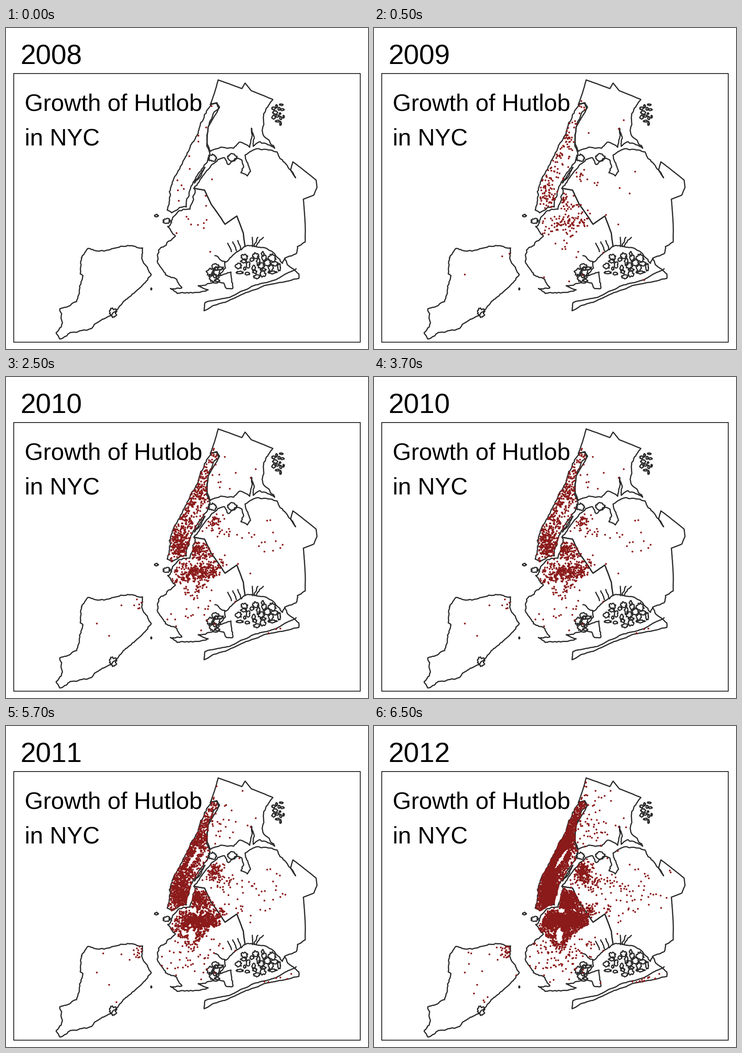
Write a matplotlib script that moves like this. It is 795 px wide and 705 px high and loops after 8 s.

```python
import numpy as np
import matplotlib.pyplot as plt
from matplotlib.animation import FuncAnimation
from matplotlib.path import Path

W, H, PX = 795, 705, 0.72
INK, DOT = "#2b2b2b", "#8b1a1a"
SHARE = (0.004, 0.055, 0.2, 0.45, 1)  # part of all dots present in each year
rng = np.random.default_rng(7)
plt.rcParams["text.kerning_factor"] = 6  # unkerned digits


def rough(*flat, grain=1.0):
    """Join a few key points by midpoint displacement, like a coastline."""
    line = np.array(flat, float).reshape(-1, 2)
    while True:
        step = np.diff(line, axis=0)
        length = np.hypot(*step.T)
        if length.max() < 5:
            return line
        long = np.flatnonzero(length >= 5)
        sigma = grain * (0.4 + 0.03 * length[long, None])
        middle = line[long] + step[long] / 2 + rng.normal(0, 1, (len(long), 2)) * sigma
        line = np.insert(line, long + 1, middle, axis=0)


def straight(*flat):
    return rough(*flat, grain=0.15)


def blob(cx, cy, rx, ry):
    n = int(9 + rx + ry)
    angle = np.linspace(0, 2 * np.pi, n)
    r = rng.uniform(0.65, 1.15, n)
    r[-1] = r[0]
    return np.column_stack([cx + rx * r * np.cos(angle), cy + ry * r * np.sin(angle)])


def archipelago(cx, cy, rx, ry, count, size):
    """Small islands scattered evenly over an ellipse."""
    for k in range(count):
        angle, r = 2.4 * k, np.sqrt((k + 0.5) / count)
        x, y = cx + rx * r * np.cos(angle), cy + ry * r * np.sin(angle)
        yield blob(x, y, *size * rng.uniform(0.4, 1.3, 2))


manhattan = rough(
    452, 166, 440, 183, 422, 232, 394, 283, 369, 330, 362, 350, 354, 400, 364, 406,
    380, 395, 396, 393, 402, 365, 414, 335, 441, 296, 448, 276, 441, 245, 444, 217,
    467, 176, 463, 166, 452, 166)
bronx = np.vstack([
    straight(449, 168, 457, 145, 466, 114, 518, 133, 525, 121, 539, 138, 586, 157),
    rough(586, 157, 566, 188, 564, 233, 590, 264, 556, 250, 543, 260, 539, 220,
          535, 262, 512, 251, 500, 264, 475, 262, 449, 271),
    rough(449, 271, 442, 255, 444, 217, 469, 174, 463, 164, 449, 168, grain=0.4)])
border = straight(413, 352, 436, 356, 450, 386, 481, 431, 507, 413, 521, 450, 525, 480)
queens = np.vstack([
    rough(413, 352, 440, 314, 465, 289, 480, 285, 488, 300, 508, 286, 518, 290, 522, 305,
          516, 318, 530, 325, 537, 315, 525, 279, 555, 265, 595, 272, 604, 288, 636, 329),
    straight(636, 329, 625, 312, 630, 294, 681, 334, 683, 350, 676, 367, 653, 376,
             657, 430, 657, 470),
    rough(657, 470, 640, 480, 638, 495, 612, 506, 607, 517, 590, 496, 565, 482, 525, 480),
    border[::-1]])
brooklyn = np.vstack([
    border,
    rough(525, 480, 498, 499, 480, 515, 482, 527, 462, 545, 494, 536, 498, 572,
          484, 572, 478, 560, 422, 566, 444, 575),
    rough(444, 575, 376, 583, 361, 572, 386, 571, 375, 552, 350, 542, 332, 512, 335, 488,
          372, 457, 355, 436, 379, 402, 404, 398, 415, 363, 413, 352)])
staten = rough(
    166, 505, 180, 484, 215, 490, 275, 478, 300, 483, 298, 505, 319, 542, 295, 570,
    240, 623, 195, 650, 188, 660, 160, 666, 118, 683, 110, 670, 122, 652, 118, 617,
    155, 601, 169, 544, 163, 540, 166, 505)
rockaway = rough(612, 506, 618, 520, 643, 540, 643, 550, 570, 565, 500, 594, 435, 621,
                 437, 603, 490, 592, 550, 564, 600, 549, 637, 529, grain=0.5)
north_brooklyn = straight(414, 355, 437, 363, 472, 412, 470, 435, 434, 460, 411, 504,
                          374, 456, 360, 442, 381, 405, 405, 403)

islands = [blob(353, 424, 8, 6), blob(453, 285, 9, 8), blob(496, 284, 11, 8),
           blob(235, 625, 8, 10), blob(330, 412, 4, 3), blob(319, 573, 1, 2),
           rough(414, 340, 424, 325, 437, 306, 427, 327, 414, 340),
           *archipelago(553, 522, 50, 27, 24, 7),
           *archipelago(599, 188, 14, 24, 13, 4),
           *archipelago(459, 540, 11, 24, 6, 8)]
creeks = [rough(459, 500, 481, 513)]
for k in range(3):
    creeks += [rough(487 + 11 * k, 473 - 3 * k, 495 + 11 * k, 491 - 2 * k),
               rough(541 + 12 * k, 460, 541 + 4 * k, 480)]

# Empty parkland: centre x, y, radii, slant
PARKS = [(410, 292, 5, 22, -0.6), (406, 460, 7, 17, 0), (411, 405, 7, 6, 0)]

# Land, centre x, y, spread x, y, slant, dots in the last year
CLUSTERS = [
    (manhattan, 384, 372, 12, 16, 0, 800),
    (manhattan, 405, 285, 16, 70, -0.38, 2000),
    (north_brooklyn, 423, 380, 12, 12, 0, 450),
    (north_brooklyn, 425, 427, 28, 9, 0, 950),
    (north_brooklyn, 415, 435, 40, 40, 0, 1100),
    (brooklyn, 405, 490, 45, 40, 0, 130),
    (queens, 459, 318, 9, 11, 0, 190),
    (queens, 478, 342, 22, 8, 0, 65),
    (queens, 475, 404, 7, 8, 0, 45),
    (queens, 540, 375, 50, 35, 0, 85),
    (bronx, 465, 195, 35, 50, 0, 65),
    (staten, 291, 492, 6, 10, 0, 28),
    (staten, 250, 540, 60, 60, 0, 14),
    (rockaway, 585, 552, 20, 8, 0, 14),
]


def slanted(xy, cx, cy, rx, ry, slant):
    dx, dy = (xy - (cx, cy)).T
    return np.hypot((dx - slant * dy) / rx, dy / ry)


def cluster_dots(land, cx, cy, sx, sy, slant, count):
    n = count * 12 + 60
    dy = rng.normal(0, sy, n)
    xy = np.column_stack([cx + rng.normal(0, sx, n) + slant * dy, cy + dy])
    keep = Path(land).contains_points(xy)
    for park in PARKS:
        keep &= slanted(xy, *park) > 1
    return xy[keep][:count]


fig = plt.figure(figsize=(W / 100, H / 100), dpi=100, facecolor="white")
ax = fig.add_axes([0, 0, 1, 1])
ax.set(xlim=(0, W), ylim=(H, 0))
ax.axis("off")


def stroke(line, width=2.6, color=INK):
    ax.plot(*line.T, color=color, lw=width * PX, solid_joinstyle="round", zorder=1)


def label(x, y, text, size):
    return ax.text(x, y, text, family="Liberation Sans", size=size * PX,
                   color="black", va="baseline", zorder=4)


for shape in (manhattan, bronx, queens, brooklyn, staten, rockaway, *islands, *creeks):
    stroke(shape)
ax.add_patch(plt.Rectangle((17, 100), 761, 590, fill=False, ec="black", lw=1.6 * PX))
title = label(32, 80, "", 61)
label(41, 182, "Growth of Hutlob", 52)
label(41, 257, "in NYC", 52)

groups = [cluster_dots(*cluster) for cluster in CLUSTERS]
layers = []
for share in SHARE:
    dots = np.vstack([g[:round(len(g) * share)] for g in groups])
    layers.append(ax.scatter(*dots.T, s=(4 * PX) ** 2, c=DOT, lw=0, zorder=3))


def update(i):
    year = (i + 3) // 4
    title.set_text(str(2008 + year))
    for y, layer in enumerate(layers):
        layer.set_visible(y == year)
    return [title, *layers]


anim = FuncAnimation(fig, update, frames=16, interval=500, repeat=True,
                     repeat_delay=0, init_func=lambda: update(0), blit=False)
plt.show()
```
